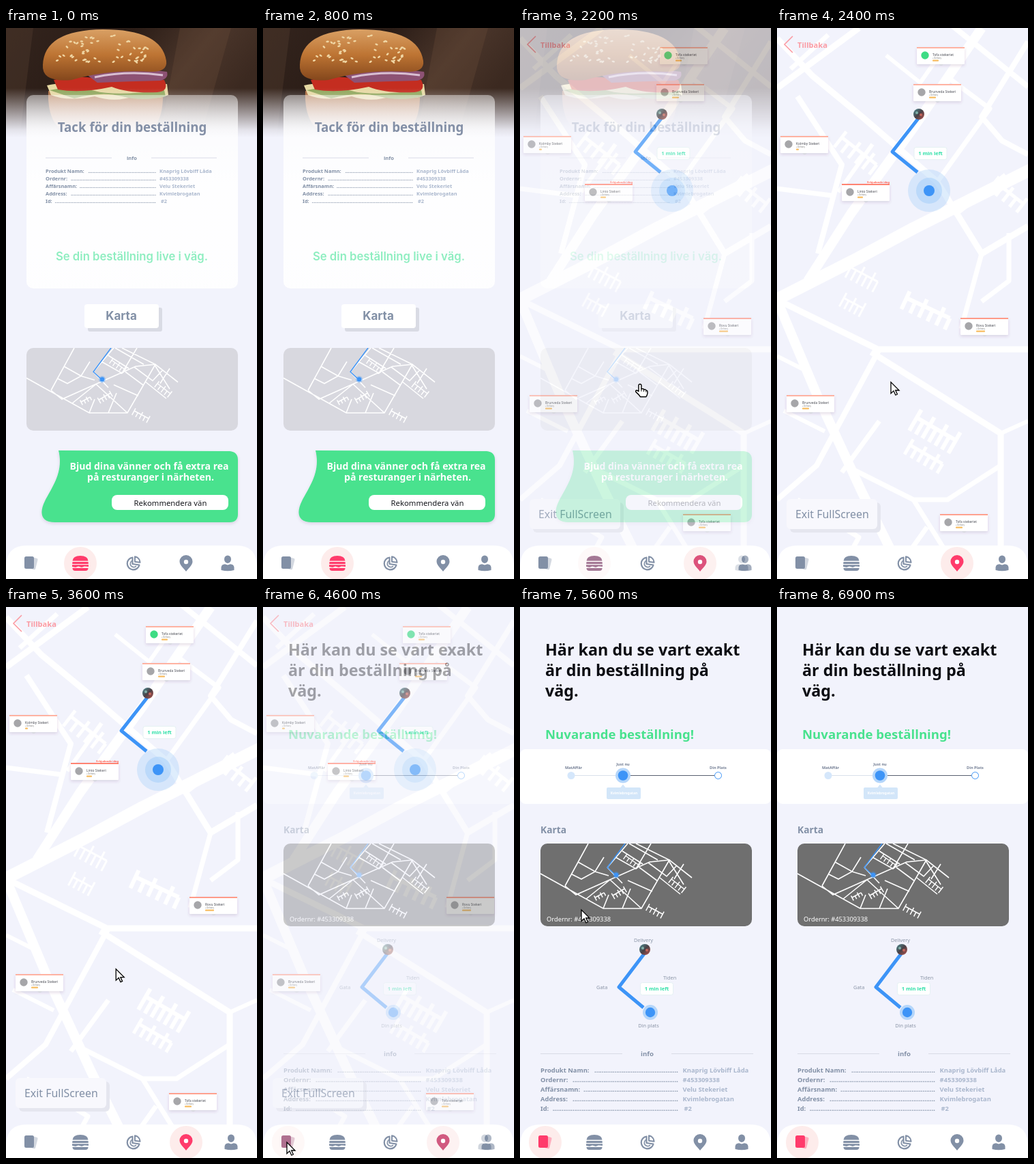
Write an HTML page that moves like this. It is 368 px wide and 806 px high and loops after 7200 ms.

```html
<!DOCTYPE html>
<html lang="sv">
<head>
<meta charset="utf-8">
<title>Beställning</title>
<style>
html, body { margin: 0; width: 100%; height: 100%; overflow: hidden; background: #f2f3fc; }
svg { display: block; width: 368px; height: 806px; font-family: "Noto Sans", "Open Sans", sans-serif; }
.geo { font-family: Inter, sans-serif; }
</style>
</head>
<body>
<svg id="stage" viewBox="0 0 368 806" xmlns="http://www.w3.org/2000/svg"></svg>
<script>
const LOOP = 7200;
const BG = '#f2f3fc', SLATE = '#8290a6', PALE = '#aab7cd', BLUE = '#3d94f7';
const GREEN = '#48e28e', PINK = '#ff3b6b';

// Drawing helpers
const rect = (x, y, w, h, r, fill, more = '') =>
  `<rect x="${x}" y="${y}" width="${w}" height="${h}" rx="${r}" fill="${fill}" ${more}/>`;
const dot = (x, y, r, fill, more = '') =>
  `<circle cx="${x}" cy="${y}" r="${r}" fill="${fill}" ${more}/>`;
const line = (d, color, width, more = '') =>
  `<path d="${d}" fill="none" stroke="${color}" stroke-width="${width}" ${more}/>`;
const shape = (d, fill, more = '') => `<path d="${d}" fill="${fill}" ${more}/>`;
const text = (x, y, size, str, fill, o = {}) =>
  `<text x="${x}" y="${y}" font-size="${size}" fill="${fill}" font-weight="${o.weight || 700}"` +
  ` text-anchor="${o.anchor || 'start'}" class="${o.font || ''}">${str}</text>`;
const mid = (x, y, size, str, fill, o = {}) => text(x, y, size, str, fill, { ...o, anchor: 'middle' });
const at = (x, y, body, more = '') => `<g transform="translate(${x} ${y}) ${more}">${body}</g>`;

function seeded(seed) {
  return () => (seed = (seed * 16807) % 2147483647) / 2147483647;
}

// A row of small houses: a spine with ribs
function comb(x, y, angle, count, gap, rib, width) {
  let d = `M0 0H${(count - 1) * gap}`;
  for (let i = 0; i < count; i++) d += `M${i * gap} ${i % 2 ? 0 : -rib * 0.6}V${rib}`;
  return at(x, y, line(d, '#fff', width), `rotate(${angle})`);
}

const defs = `<defs>
  <linearGradient id="wall" x2="1" y2="0.35">
    <stop offset="0" stop-color="#33241d"/><stop offset=".45" stop-color="#2a1c16"/>
    <stop offset=".75" stop-color="#4b362b"/><stop offset="1" stop-color="#3b2920"/>
  </linearGradient>
  <linearGradient id="bun" x2="0" y2="1">
    <stop offset="0" stop-color="#d9a064"/><stop offset=".5" stop-color="#bd7433"/>
    <stop offset="1" stop-color="#84471c"/>
  </linearGradient>
  <linearGradient id="fade" x2="0" y2="1">
    <stop offset="0" stop-color="${BG}" stop-opacity="0"/><stop offset=".85" stop-color="${BG}" stop-opacity=".92"/>
    <stop offset="1" stop-color="${BG}"/>
  </linearGradient>
  <linearGradient id="glass" x2="0" y2="1">
    <stop offset="0" stop-color="#fff" stop-opacity=".42"/><stop offset=".16" stop-color="#fff" stop-opacity=".72"/>
    <stop offset=".5" stop-color="#fff" stop-opacity=".95"/><stop offset="1" stop-color="#fff" stop-opacity=".9"/>
  </linearGradient>
  <linearGradient id="shop" x2="1" y2="1">
    <stop offset="0" stop-color="#4b8d92"/><stop offset=".5" stop-color="#4a4147"/><stop offset="1" stop-color="#b8524c"/>
  </linearGradient>
  <clipPath id="tile">${rect(0, 0, 310, 121, 10, '#000')}</clipPath>
  <filter id="soft" x="-20%" y="-20%" width="140%" height="160%">
    <feDropShadow dx="0" dy="2" stdDeviation="2" flood-color="#536" flood-opacity=".16"/>
  </filter>
</defs>`;

// Navigation bar
const icons = {
  cards: c => rect(-3, -9, 11, 17, 2, c, 'opacity=".35" transform="rotate(14)"') + rect(-10, -10, 14, 18, 2.5, c),
  burger: c => shape('M-11.5 -3.5Q-11 -11 0 -11T11.5 -3.5Z', c) +
    rect(-12, -2, 24, 3, 1.5, c) + shape('M-12 2.3H12V5L6 4.4 2 6 -3 4.4 -7 6 -12 5Z', c) +
    shape('M-11.5 7H11.5Q11.5 11 7.5 11H-7.5Q-11.5 11 -11.5 7Z', c),
  pizza: c => line('M-1.5 -8.5A9 9 0 1 0 8.5 2.5L-1.5 1Z', c, 2.2, 'stroke-linejoin="round"') +
    line('M-1.5 -4A5 5 0 1 0 4 4', c, 1.6) +
    line('M2 -9.8A9 9 0 0 1 9.6 -1.2L2 -2.2Z', c, 2, 'stroke-linejoin="round"'),
  pin: c => shape('M0 12C-5 6 -9.5 2 -9.5 -2.5A9.5 9.5 0 0 1 9.5 -2.5C9.5 2 5 6 0 12Z', c) + dot(0, -2, 3.2, '#fff'),
  person: c => shape('M-5 -6A5 5.5 0 0 1 5 -6Q5 -1 0 0Q-5 -1 -5 -6Z', c) +
    shape('M-9.5 10V6Q-9 1.5 -4 1.2L0 2.5 4 1.2Q9 1.5 9.5 6V10Q0 12.5 -9.5 10Z', c),
};

function nav(active, personX = 325) {
  const places = { cards: 37, burger: 109, pizza: 187, pin: 264, person: personX };
  let out = shape('M0 806V785Q2 757 30 757H338Q366 757 368 785V806Z', '#fff');
  for (const [name, x] of Object.entries(places)) {
    const on = name === active;
    if (on) out += dot(x, 783, 24, '#fdeceb');
    out += at(x, 783, icons[name](on ? PINK : SLATE));
  }
  return out;
}

// Small street map shared by two screens
function tileMap(x, y, fill) {
  const roads = 'M0 44L92 95H148L189 24 140 0M70 0L36 62M55 27L80 41 93 20M46 45L60 52 80 41 100 47' +
    'M36 62L52 75 160 27 189 24 222 50M67 81L102 53 148 95M98 35L128 0M98 35L120 58M110 20L140 37 162 0' +
    'M120 11L150 30M130 0L172 24M128 54L164 70M145 35L172 55M158 28L185 48 200 32M175 50L205 74' +
    'M188 25L210 60M210 30L196 52M92 95L100 75M120 95L132 66';
  const houses = comb(80, 79, -28, 4, 5, 5, 1.5) + comb(106, 76, -30, 5, 5, 6, 1.5) +
    comb(125, 18, 35, 5, 6, 6, 1.4) + comb(192, 52, 38, 5, 6, 7, 1.5) + comb(158, 92, 28, 5, 6, 7, 1.5);
  return at(x, y, rect(0, 0, 310, 121, 10, fill) + '<g clip-path="url(#tile)">' +
    line(roads, '#fff', 1.6) + houses + line('M124 0L98 35 110 46', BLUE, 1.4) +
    dot(111, 46, 5, BLUE, 'opacity=".35"') + dot(111, 46, 3.2, BLUE) + '</g>');
}

// Order details
const order = [
  ['Produkt Namn:', 'Knaprig Lövbiff Låda', 60],
  ['Ordernr:', '#453309338', 34.5],
  ['Affärsnamn:', 'Velu Stekeriet', 49],
  ['Address:', 'Kvimlebrogatan', 35],
  ['Id:', '#2', 12.5],
];

function details(x, y, size, step, dotEnd, valueX) {
  const k = size / 7.45;
  return order.map(([label, value, width], i) => {
    const row = y + i * step, from = x + width * k;
    const dots = '.'.repeat(Math.floor((dotEnd - from) / (0.286 * size)));
    return text(x, row, size, label, SLATE) + text(dotEnd, row, size, dots, SLATE, { anchor: 'end' }) +
      text(valueX + (i === 4 ? 2 : 0), row, size, value, PALE);
  }).join('');
}

const badge = (x, y) => rect(x, y, 48, 18, 3, '#fff', 'stroke="#e4f1f3" stroke-width="1"') +
  mid(x + 24, y + 11.7, 7.5, '1 min left', '#2fe0a8');

const shop = (x, y) => dot(x, y, 8, 'url(#shop)') + dot(x - 3, y - 2, 2, '#7fb0a8') + dot(x + 3, y + 1, 2, '#c4665c');

function photo() {
  const rnd = seeded(41);
  let seeds = '';
  for (let i = 0; i < 55; i++) {
    const a = Math.PI * rnd(), r = Math.sqrt(rnd());
    const x = 145 + 74 * r * Math.cos(a), y = 50 - 42 * r * Math.sin(a);
    seeds += `<ellipse cx="${x}" cy="${y}" rx="2.3" ry="1.3" fill="#f0d6a4" transform="rotate(${rnd() * 90 - 45} ${x} ${y})"/>`;
  }
  return rect(0, 0, 368, 160, 0, 'url(#wall)') +
    shape('M255 0H330L285 160H225Z', '#6a4c3a', 'opacity=".3"') +
    shape('M0 0H40L20 160H0Z', '#584033', 'opacity=".35"') +
    shape('M62 92Q60 150 100 156H196Q232 150 230 92Z', '#a9683a') +
    shape('M60 84Q100 74 236 82L238 98Q220 106 190 99 160 110 130 100 90 108 66 98Z', '#e7d9a3') +
    shape('M64 91Q100 84 130 92T232 91L234 100Q200 108 170 100T100 103Z', '#8fa65a') +
    shape('M70 76Q110 66 155 78L232 76Q240 92 222 94 180 96 155 86 110 96 76 90Z', '#c42d20') +
    shape('M118 68Q170 56 236 64Q239 74 226 77 180 78 134 80Z', '#8d5274') +
    line('M130 72Q178 62 230 69', '#d9bfd2', 3) +
    shape('M54 54Q56 3 142 2Q228 2 235 48Q237 64 214 64 150 60 96 76 52 80 54 54Z', 'url(#bun)') + seeds +
    rect(0, 88, 368, 72, 0, 'url(#fade)');
}

function orderScreen() {
  const bubble = 'M77 618L328 619Q340 620 340 632V711Q340 723 328 723H72C50 723 49 708 57 692C67 672 85 650 77 618Z';
  return rect(0, 0, 368, 806, 0, BG) + photo() +
    rect(30, 98, 310, 283, 10, 'url(#glass)') +
    mid(185, 152, 18.7, 'Tack för din beställning', '#838fa6') +
    line('M58 190H155M213 190H309', '#e6e8ef', 1.4) + mid(184.5, 193, 7.6, 'info', SLATE) +
    details(58, 212, 7.45, 11, 220, 225) +
    mid(184.5, 340, 16.7, 'Se din beställning live i väg.', '#8eeec0', { weight: 600, font: 'geo' }) +
    rect(120, 409, 109, 35, 3, '#d9dbe4') + rect(115, 404, 109, 35, 4, '#fff') +
    mid(169, 427, 17, 'Karta', SLATE, { font: 'geo' }) +
    tileMap(30, 468, '#d8d8df') +
    shape(bubble, GREEN, 'filter="url(#soft)"') +
    mid(210, 646, 14.05, 'Bjud dina vänner och få extra rea', '#fff') +
    mid(212, 662, 14.05, 'på resturanger i närheten.', '#fff') +
    rect(155, 683, 171, 22, 8, '#fff') +
    mid(241, 699, 11.3, 'Rekommendera vän', '#15171c', { weight: 400 }) +
    nav('burger');
}

function placeCard(x, y, name, o = {}) {
  return at(x, y, rect(0, 0, 70, 25, 1.5, '#fff', 'filter="url(#soft)"') +
    rect(0, 0, 70, 1.7, 0, o.bar || '#ffa793') +
    dot(12, 12, 5.7, o.icon || '#a6a6a9') +
    text(23, 13, 4.9, name, '#4b4d55', { weight: 500 }) +
    text(23, 17, 2.8, '+ Delivery', '#777', { weight: 500 }) +
    rect(23, 18.5, o.stars || 10, 2.3, 0.8, '#f8bd62') +
    shape('M32 25H39Q35.5 29.5 32 25Z', '#d8d9e0') +
    (o.note ? text(70, -1.5, 4, o.note, '#ff5b4d', { anchor: 'end' }) : ''));
}

function mapScreen() {
  const roads = [
    [18, 'M-10 402L120 336 200 293 380 203'],
    [14, 'M0 398L60 540 125 680 190 810M45 370L108 272 200 146 300 0'],
    [9, 'M-5 395L148 470H370M138 474L328 593V800M0 88L120 0M0 15L52 70 125 130 235 225 300 330 368 290'],
    [8, 'M150 470L58 640 0 690M255 -5L368 86M368 20L300 130 330 165 368 185M30 100L95 200 60 330'],
    [7, 'M235 225L312 118 250 72M265 270L335 215M300 330L270 440M340 300V370L300 400M0 235L80 245M20 60L75 10'],
    [7, 'M100 640L200 690 250 770M150 575L95 650M328 640L250 690 200 690M170 800L220 730M30 690L120 745 90 800'],
    [6, 'M328 593L368 575M0 480L40 500M140 170L90 240M160 40L210 80 245 30M70 590L10 560'],
  ].map(([w, d]) => line(d, '#fff', w, 'stroke-linejoin="round"')).join('');
  const houses = comb(108, 350, 28, 6, 9, 17, 3) + comb(98, 395, 28, 5, 8, 14, 3) +
    comb(190, 395, 25, 6, 14, 18, 6) + comb(205, 570, 30, 7, 11, 22, 6) +
    comb(195, 610, 30, 6, 11, 16, 5) + comb(95, 160, 38, 6, 13, 18, 5) + comb(320, 225, 38, 5, 13, 16, 5);
  const cards = [
    [205, 28, 'Tofa stekeriet', { icon: '#3ddc84', stars: 9 }],
    [200, 82, 'Brunveda Stekeri'],
    [5, 158, 'Kolmby Stekeri', { stars: 4 }],
    [95, 228, 'Linto Stekeri', { bar: '#ff705c', note: 'Erbjudande idag', stars: 8 }],
    [269, 424, 'Rovu Stekeri', { bar: '#ff8b75', stars: 13 }],
    [14, 537, 'Brunveda Stekeri'],
    [239, 711, 'Tofa stekeriet', { bar: '#ff937d' }],
  ].map(c => placeCard(...c)).join('');
  return rect(0, 0, 368, 806, 0, BG) + roads + houses +
    line('M23 12L11 24 23 36', '#fb9ba3', 1.6) + text(30, 29, 11.1, 'Tillbaka', '#fb9ba3') +
    dot(223, 238, 31, '#a9d0f7', 'opacity=".38"') + dot(223, 238, 19, '#8fc3f7', 'opacity=".38"') +
    line('M209 130L169 181 206 211', BLUE, 5, 'stroke-linejoin="round"') +
    dot(223, 238, 8, BLUE) + shop(208, 126) + badge(201, 174.5) + cards +
    rect(19, 694, 133, 44, 6, '#e5e6ef') + rect(14, 689, 133, 44, 6, '#f8f8fd') +
    text(27, 717, 15.9, 'Exit FullScreen', SLATE, { weight: 400 }) +
    nav('pin', 330);
}

function statusScreen() {
  const tiny = { weight: 400 }, grey = '#8b95a7';
  return rect(0, 0, 368, 806, 0, BG) +
    ['Här kan du se vart exakt', 'är din beställning på', 'väg.']
      .map((s, i) => text(37, 71 + 30 * i, 23.3, s, '#0b0c12')).join('') +
    text(37, 193, 18.6, 'Nuvarande beställning!', GREEN) +
    rect(0, 208, 368, 80, 8, '#fff') +
    line('M75 246.5H151', '#d9e0ea', 1) + line('M151 246.5H285', '#596070', 1) +
    dot(75, 246.5, 5.5, '#d5e7fb') + dot(151, 246.5, 11, '#b5d6fa') + dot(151, 246.5, 7.3, BLUE) +
    dot(290.5, 246.5, 5, '#fff', `stroke="${BLUE}" stroke-width="1"`) +
    mid(78.5, 237, 5.6, 'MatAffär', '#727d93') + mid(151, 232, 5.6, 'Just nu', '#727d93') +
    mid(290.5, 237, 5.6, 'Din Plats', '#727d93') +
    rect(127, 264, 50, 17, 2, '#d3e6f9') + shape('M147 264.5L151 259.5 155 264.5Z', '#d3e6f9') +
    mid(152.5, 273.5, 4.9, 'Kvimlebrogatan', '#fff') +
    text(30, 331, 13.8, 'Karta', SLATE) +
    tileMap(30, 346, '#6f6f6f') +
    text(39, 460, 9.3, 'Ordernr: #453309338', '#fff', tiny) +
    line('M183 506L145 556 181 586', BLUE, 5, 'stroke-linejoin="round"') + shop(183, 501) +
    dot(191, 593, 11, '#b5d6fa') + dot(191, 593, 7.2, BLUE) +
    mid(181, 490, 7.4, 'Delivery', grey, tiny) + text(112, 559, 7.4, 'Gata', grey, tiny) +
    text(210, 545, 7.4, 'Tiden', grey, tiny) + mid(188.5, 615, 7.4, 'Din plats', grey, tiny) +
    badge(176.5, 549.5) +
    line('M30 653.5H150M222 653.5H342', '#d8dbe5', 1) + mid(186.5, 657, 9.6, 'info', SLATE) +
    details(30, 681, 9.4, 14, 232, 238.5) +
    nav('cards');
}

const arrow = shape('M0 0V16.5L4 12.8 6.8 19 9.4 17.8 6.7 12H12Z', '#fff', 'stroke="#000" stroke-width="1.3"');
const hand = shape('M-2 10V1.4Q-2 -.6 0 -.6T2 1.4V6.5Q5 5.4 5.6 7.3 8.6 6.6 8.9 8.6 11 8.3 11 10.6V13Q10.4 16 8.8 18H.6Q-1.6 14.6 -6 10.8-7 8.8-5 8.4-3.6 8.6-2 10Z',
  '#fff', 'stroke="#000" stroke-width="1.4" stroke-linejoin="round"') + line('M2 6.5V10M5.6 7.5V10.4M8.8 9V11', '#000', 1);

document.getElementById('stage').innerHTML = defs + `<g>${orderScreen()}</g>` +
  `<g id="map">${mapScreen()}</g><g id="status">${statusScreen()}</g>` +
  `<g id="cursor"><g id="arrow">${arrow}</g><g id="hand">${hand}</g></g>`;

const el = id => document.getElementById(id);
const map = el('map'), status_ = el('status'), cursor = el('cursor'), arrowEl = el('arrow'), handEl = el('hand');

// Pointer stops: time, x, y
const stops = [
  [1300, 372, 560], [1800, 177, 522], [2150, 177, 522], [2400, 167, 518], [3500, 167, 518],
  [4300, 35, 783], [4800, 35, 783], [5600, 90, 443], [6100, 94, 436],
];
const clamp = v => Math.min(1, Math.max(0, v));
const easeOut = v => 1 - (1 - v) ** 2;
const smooth = v => v * v * (3 - 2 * v);
const appear = (t, start, length) => easeOut(clamp((t - start) / length));

function pointer(t) {
  const i = stops.findIndex((s, n) => n && t <= s[0]);
  if (i < 1 || t < stops[0][0]) return null;
  const [t0, x0, y0] = stops[i - 1], [t1, x1, y1] = stops[i];
  const k = smooth((t - t0) / (t1 - t0));
  return [x0 + (x1 - x0) * k, y0 + (y1 - y0) * k];
}

function show(node, opacity) {
  node.style.opacity = opacity;
  node.style.display = opacity > 0 ? '' : 'none';
}

function draw(t) {
  show(map, appear(t, 2050, 320));
  show(status_, appear(t, 4540, 300));
  const p = pointer(t);
  show(cursor, p ? 1 : 0);
  if (!p) return;
  cursor.setAttribute('transform', `translate(${p[0]} ${p[1]})`);
  const overTile = t < 2300 && p[0] < 340;
  show(handEl, overTile ? 1 : 0);
  show(arrowEl, overTile ? 0 : 1);
}

const start = performance.now();
function tick() {
  draw((performance.now() - start) % LOOP);
  requestAnimationFrame(tick);
}
tick();
</script>
</body>
</html>
```
